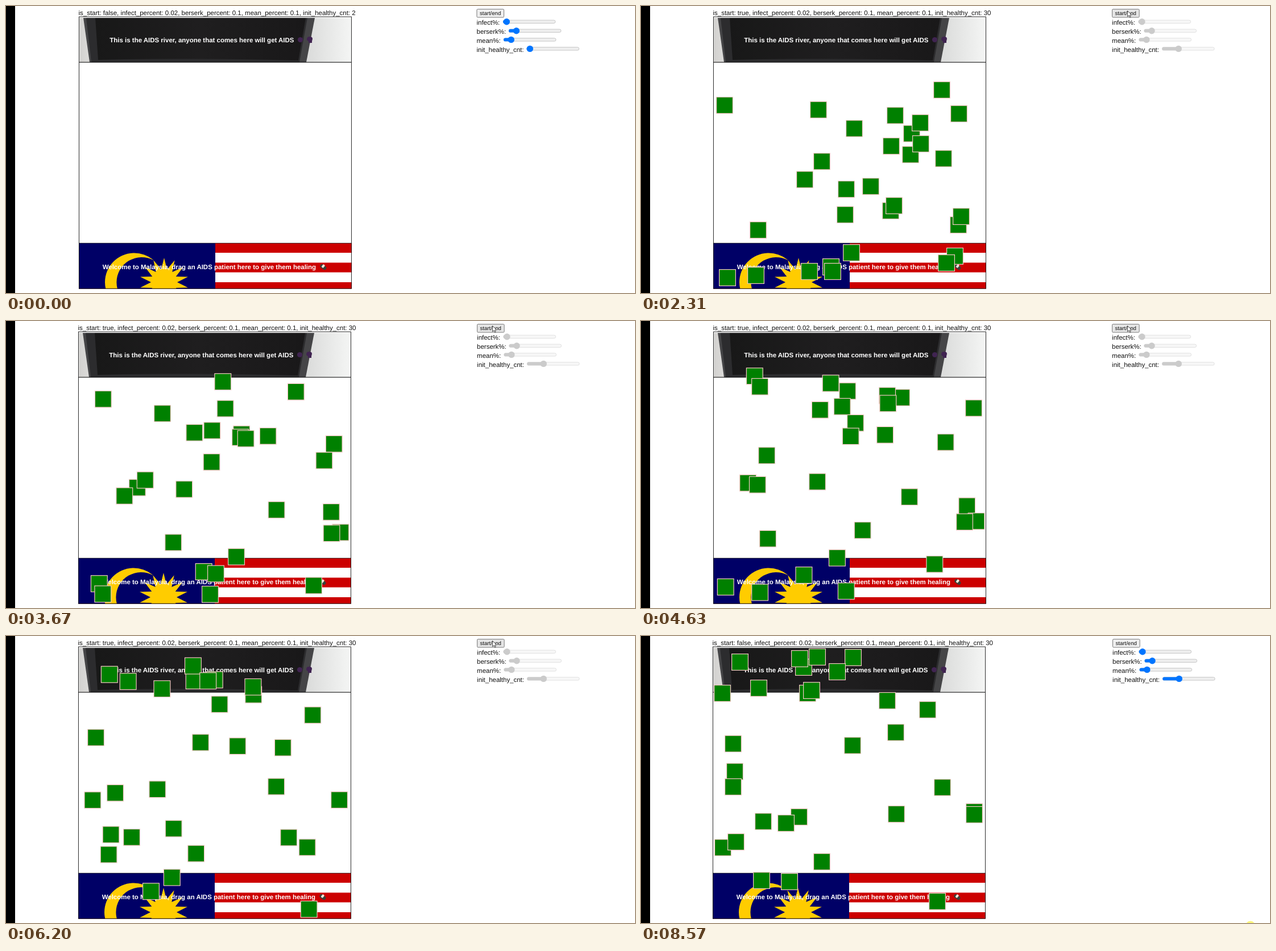
Write an HTML page that moves like this. It is 1106 px wide and 506 px high and loops after 8.64 s.

```html
<!DOCTYPE html>
<html lang="en">
<head>
<meta charset="utf-8">
<title>Infection simulator</title>
<style>
  html, body { margin: 0; width: 100%; height: 100%; overflow: hidden; background: #fff; }
  svg { display: block; width: 1106px; height: 506px; }
  text { font: 11.48px "Liberation Sans", Arial, sans-serif; fill: #111; text-rendering: geometricPrecision; white-space: pre; }
  .bold { font-weight: bold; fill: #fff; }
  .button { font-size: 9.58px; }
</style>
</head>
<body>
<svg viewBox="0 0 1106 506">
  <defs>
    <linearGradient id="wall"><stop offset="0" stop-color="#d2d1cf"/><stop offset=".06" stop-color="#e2e1df"/><stop offset=".85" stop-color="#dcdddc"/><stop offset="1" stop-color="#f4f5f4"/></linearGradient>
    <linearGradient id="screen"><stop offset="0" stop-color="#181818"/><stop offset=".5" stop-color="#1f1e1f"/><stop offset="1" stop-color="#191819"/></linearGradient>
    <clipPath id="banner"><rect x="128" y="418" width="480" height="80.5"/></clipPath>
  </defs>
  <rect width="16" height="506"/>
  <g id="left">
    <text id="status" x="127.5" y="15.6"></text>
    <rect x="129.5" y="21" width="477" height="78" fill="url(#wall)"/>
    <path d="M136 21H543L528 99H147Z" fill="#454547"/>
    <path d="M141 21H530L516 99H150Z" fill="#2c2c2e"/>
    <path d="M157 21H527L514 96Q330 91 162 95Z" fill="url(#screen)"/>
    <path d="M128 99.2H607" stroke="#000"/>
    <g id="flag" clip-path="url(#banner)"></g>
    <rect x="128.4" y="19" width="479" height="479.2" fill="none" stroke="#111" stroke-width=".9"/>
    <path d="M128 418.2H607" stroke="#111" stroke-width=".8"/>
    <text class="bold" x="182.3" y="63.8">This is the AIDS river, anyone that comes here will get AIDS</text>
    <g fill="#402451">
      <circle cx="517.5" cy="59.5" r="4.6"/>
      <path d="M529 59q0-5 5-5t5 4l-1 4v3h-6v-3q-3-1-3-3"/>
    </g>
    <text class="bold" x="169.7" y="463.6">Welcome to Malaysia, drag an AIDS patient here to give them healing</text>
    <g transform="rotate(38 558 460)">
      <rect x="552" y="457" width="12" height="6.5" rx="3" fill="#3a413a"/>
      <rect x="555" y="456" width="4" height="6" rx="1.5" fill="#f4e6d8"/>
    </g>
  </g>
  <g id="boxes" fill="green" stroke="#f5c6c4" stroke-width="1.2"></g>
  <g id="panel">
    <rect id="button" x="827.9" y="5.6" width="47.6" height="14.4" rx="1.6" stroke="#6b6b6b" stroke-width=".9"/>
    <text class="button" x="851.6" y="15.7" text-anchor="middle">start/end</text>
  </g>
  <circle id="glow" cx="1071.5" cy="511" r="8.5" fill="#fbf67c"/>
  <path id="cursor" d="M0 0V10.2L2.4 8L4 11.6L5.6 10.9L4.1 7.4H7.3Z" fill="#fff" stroke="#222" stroke-width=".8"/>
</svg>
<script>
const LOOP = 8640, START = 2030, SPREAD = 2310, STOP = 6960, STEP = 67;
const $ = id => document.getElementById(id);

function add(parent, tag, attrs, text) {
  const el = document.createElementNS("http://www.w3.org/2000/svg", tag);
  set(el, attrs);
  if (text) el.textContent = text;
  return parent.appendChild(el);
}
function set(el, attrs) {
  for (const key in attrs) el.setAttribute(key, attrs[key]);
}
const lerp = (a, b, f) => a + (b - a) * f;
const clamp = (v, lo, hi) => Math.min(hi, Math.max(lo, v));
const bounce = (v, lo, hi) => clamp(v < lo ? 2 * lo - v : v > hi ? 2 * hi - v : v, lo, hi);
const move = (id, x, y = 0) => set($(id), { transform: `translate(${x} ${y})` });

function drawFlag() {
  const flag = $("flag");
  for (let i = 0; i < 5; i++)
    add(flag, "rect", { x: 128, y: 418 + i * 17.25, width: 480, height: 17.25, fill: i % 2 ? "#fff" : "#c00" });
  add(flag, "rect", { x: 128, y: 418, width: 240, height: 81, fill: "#006" });
  add(flag, "path", { d: "M259.7 448.5A51.5 51.5 0 1 0 259.7 525.5A44 44 0 1 1 259.7 448.5Z", fill: "#fc0" });
  const star = Array.from({ length: 28 }, (_, i) => {
    const a = i * Math.PI / 14, r = i % 2 ? 23 : 43;
    return [278 + r * Math.sin(a), 487 - r * Math.cos(a)];
  });
  add(flag, "polygon", { points: star.join(" "), fill: "#fc0" });
}

function makeSlider(label, y, x, value) {
  const panel = $("panel");
  add(panel, "text", { x: 827.5, y: y + 5.6 }, label);
  const track = add(panel, "rect", { x, y: y - 2.7, width: 92, height: 5.4, rx: 2.7, "stroke-width": .7 });
  const bar = add(panel, "rect", { x, y: y - 2.9, height: 5.8, rx: 2.9 });
  const thumb = add(panel, "circle", { cy: y, r: 5.7 });
  return (off, at = value) => {
    const fill = off ? "#cbcbcb" : "#0075ff";
    set(track, { fill: off ? "#f7f7f7" : "#efefef", stroke: off ? "#d6d6d6" : "#b2b2b2" });
    set(bar, { width: at - x, fill });
    set(thumb, { cx: at, fill });
  };
}

// Box centres early in the run and at its end, back to front.
const early = [[147,175], [312,183], [375,216], [529,148], [559,190], [447,193], [476,225], [491,206],
  [440,247], [474,262], [492,243], [532,269], [318,274], [288,306], [361,323], [404,318],
  [359,368], [439,361], [445,352], [558,386], [563,371], [206,395], [152,479], [202,475],
  [296,468], [334,460], [337,468], [370,435], [552,441], [537,453]];
const late = [[174,46], [286,55], [279,40], [310,37], [373,38], [345,63], [143,101], [207,92],
  [293,101], [300,96], [433,114], [504,130], [448,170], [162,190], [372,193], [165,239],
  [162,266], [530,267], [449,314], [586,310], [586,315], [278,319], [255,330], [215,327],
  [144,373], [167,363], [318,398], [212,431], [261,433], [521,468]];

// Pair each box with a nearby goal by swapping goals while that shortens the trips.
function pair(from, goals) {
  const to = goals.slice();
  const cost = (a, b) => (a[0] - b[0]) ** 2 + (a[1] - b[1]) ** 2;
  for (let again = true; again;) {
    again = false;
    for (let i = 0; i < to.length; i++)
      for (let j = 0; j < i; j++)
        if (cost(from[i], to[j]) + cost(from[j], to[i]) < cost(from[i], to[i]) + cost(from[j], to[j])) {
          [to[i], to[j]] = [to[j], to[i]];
          again = true;
        }
  }
  return to;
}

let seed = 7;
function random() {
  seed = seed * 16807 % 2147483647;
  return seed / 2147483647;
}
const sway = () => Array.from({ length: 3 }, (_, k) => (random() * 2 - 1) * 70 / (k + 1));

const goals = pair(early, late);
const walks = early.map((from, i) => ({ from, to: goals[i], dx: sway(), dy: sway() }));
const lateWalks = late.map(p => walks.find(w => w.to === p));
const ticks = Math.round((STOP - SPREAD) / STEP);

function crowd(t) {
  if (t >= STOP) return late;
  const f = Math.floor((t - SPREAD) / (STOP - SPREAD) * ticks) / ticks;
  const drift = amps => amps.reduce((sum, a, k) => sum + a * Math.sin((k + 1) * Math.PI * f), 0);
  return (f < .5 ? walks : lateWalks).map(w => [
    bounce(lerp(w.from[0], w.to[0], f) + drift(w.dx), 143, 591),
    bounce(lerp(w.from[1], w.to[1], f) + drift(w.dy), 35, 483)
  ]);
}

// Pointer path: time, x, y.
const route = [[100, 1027, 416], [560, 920, 74], [820, 920, 74], [1480, 944, 74], [1630, 935, 32],
  [1770, 855.5, 8.5], [7190, 855.5, 8.5], [7360, 1003, 417], [7840, 915, 508]];

function pointer(t) {
  const i = route.findIndex(p => p[0] > t);
  if (i < 1) return [-50, -50];
  const a = route[i - 1], b = route[i], begin = Math.max(a[0], b[0] - 660);
  const f = a[0] === 7360 ? clamp((t - 7500) / 340, 0, 1) : clamp((t - begin) / (b[0] - begin), 0, 1);
  return a[0] === 1770 ? [a[1], a[2]] : [lerp(a[1], b[1], f), lerp(a[2], b[2], f)];
}

drawFlag();
const fixed = [
  makeSlider("infect%:", 27.7, 874, 880.3),
  makeSlider("berserk%:", 43.7, 884, 897.4),
  makeSlider("mean%:", 59.4, 875, 888.2)
];
const count = makeSlider("init_healthy_cnt:", 75.4, 915.6, 921.3);
const boxes = late.map(() => add($("boxes"), "rect", { width: 28.8, height: 28.8 }));

function render(t) {
  const begun = t >= START, running = begun && t < STOP;
  $("status").textContent = `is_start: ${running}, infect_percent: 0.02, berserk_percent: 0.1, ` +
    `mean_percent: 0.1, init_healthy_cnt: ${begun ? 30 : 2}`;
  move("left", !begun ? 0 : running ? -1 : -2);
  move("panel", !begun ? 0 : running ? .6 : 1.6);

  fixed.forEach(show => show(running));
  count(running, lerp(921.3, 944.6, clamp((t - 820) / 660, 0, 1)));
  set($("button"), { fill: t >= 1740 && t < 7230 ? "#e5e5e5" : "#efefef" });

  $("boxes").style.display = begun ? "" : "none";
  if (begun) crowd(t).forEach(([x, y], i) => set(boxes[i], { x: x - 14.4, y: y - 14.4 }));

  move("cursor", ...pointer(t));
  $("glow").style.display = t >= 8570 ? "" : "none";
}

function frame() {
  render(performance.now() % LOOP);
  requestAnimationFrame(frame);
}
frame();
</script>
</body>
</html>
```
